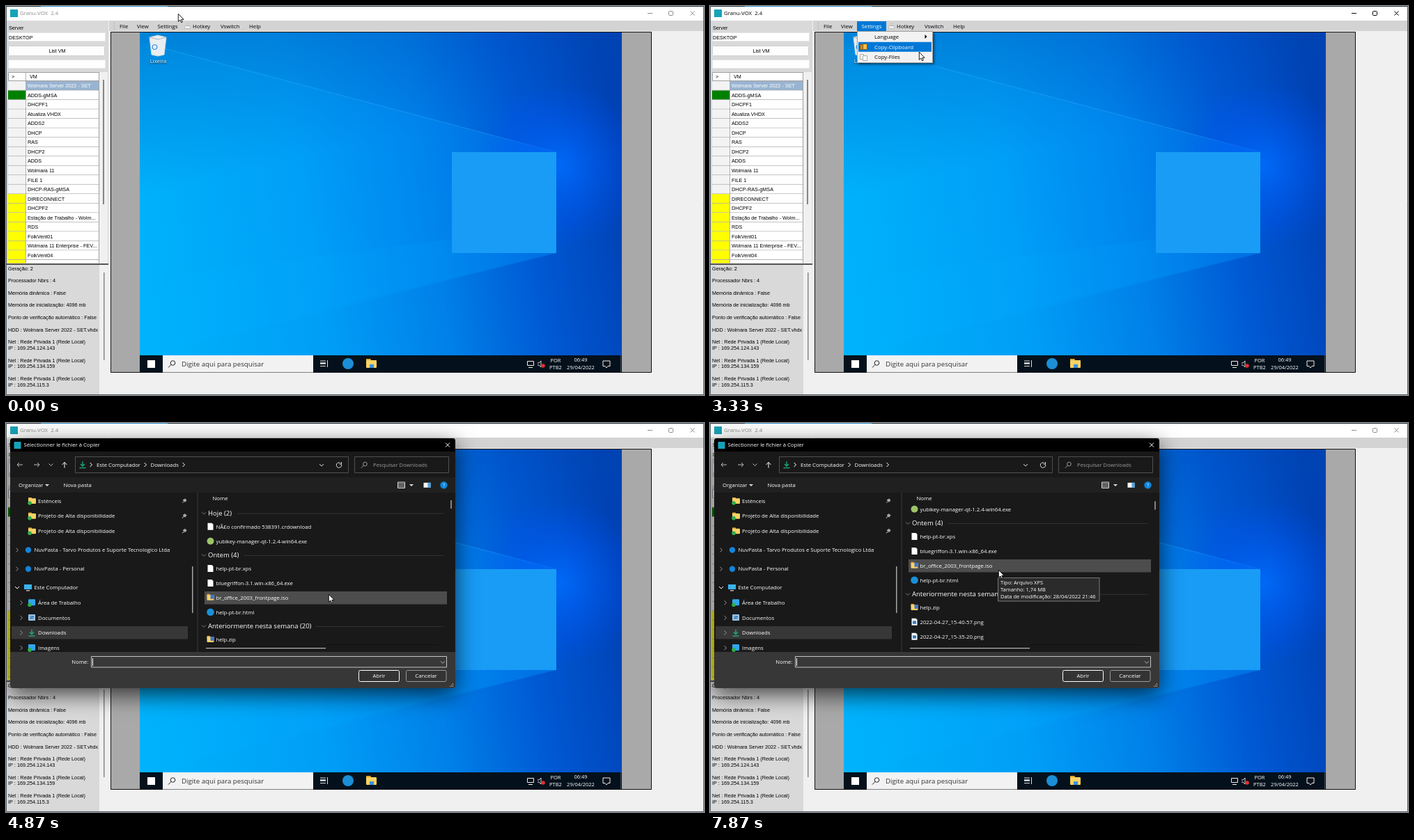
Animation of 1002x559 px, one loop 8000 ms. Source, as an HTML page with a canvas:

```html
<!DOCTYPE html>
<html lang="pt">
<head>
<meta charset="utf-8">
<title>Virtual machine manager</title>
<style>
  html, body { margin: 0; width: 100%; height: 100%; overflow: hidden; background: #f0f0f0; }
  canvas { display: block; }
</style>
</head>
<body>
<canvas id="stage" width="1002" height="559"></canvas>
<script>
const ctx = document.getElementById('stage').getContext('2d');
const LOOP = 8000, FRAME = 1000 / 15;
const UI = '"Open Sans", "Noto Sans", sans-serif';
const CLASSIC = '"Liberation Sans", Arial, sans-serif';
const TEAL = '#16a3b8', BLUE = '#0078d7';

// drawing helpers
function box(x, y, w, h, fill, stroke, radius = 0) {
  ctx.beginPath();
  ctx.roundRect(x, y, w, h, radius);
  if (fill) { ctx.fillStyle = fill; ctx.fill(); }
  if (stroke) {
    ctx.beginPath();
    ctx.roundRect(x + .5, y + .5, w - 1, h - 1, radius);
    ctx.strokeStyle = stroke; ctx.lineWidth = 1; ctx.stroke();
  }
}
function path(points, stroke, width = 1, fill) {
  ctx.beginPath();
  for (let i = 0; i < points.length; i += 2) ctx.lineTo(points[i], points[i + 1]);
  if (fill) { ctx.closePath(); ctx.fillStyle = fill; ctx.fill(); }
  if (stroke) { ctx.strokeStyle = stroke; ctx.lineWidth = width; ctx.stroke(); }
}
function disc(x, y, r, fill, stroke) {
  ctx.beginPath();
  ctx.arc(x, y, r, 0, 7);
  if (fill) { ctx.fillStyle = fill; ctx.fill(); }
  if (stroke) { ctx.strokeStyle = stroke; ctx.lineWidth = 1; ctx.stroke(); }
}
// y is the optical centre of the line
function text(str, x, y, color = '#000', size = 7.8, family = UI, align = 'left') {
  ctx.font = `${size}px ${family}`;
  ctx.textAlign = align;
  ctx.fillStyle = color;
  ctx.fillText(str, x, y + size * .35);
}
const classic = (str, x, y, color, align) => text(str, x, y, color, 7.25, CLASSIC, align);
const light = (str, x, y, size = 7.75, align) => text(str, x, y, '#fff', size, UI, align);
const cross = (x, y, r, color) => {
  path([x - r, y - r, x + r, y + r], color);
  path([x - r, y + r, x + r, y - r], color);
};
const chevron = (x, y, down, color = '#999') =>
  path(down ? [x - 3, y - 1.5, x, y + 1.5, x + 3, y - 1.5] : [x - 1.5, y - 3, x + 1.5, y, x - 1.5, y + 3], color);
function magnifier(x, y, r, color) {
  disc(x, y, r, null, color);
  path([x - r * .7, y + r * .7, x - r * 2, y + r * 2], color);
}
function gradient(g, stops) {
  stops.forEach(([at, color]) => g.addColorStop(at, color));
  return g;
}
function clipped(x, y, w, h, draw) {
  ctx.save();
  ctx.beginPath(); ctx.rect(x, y, w, h); ctx.clip();
  draw();
  ctx.restore();
}

// pointer: time, x, y
const POINTER = [
  [0, 247, 11], [330, 229, 55], [600, 219, 30], [2600, 219, 30], [3470, 306, 69], [3600, 254, 72],
  [4070, 254, 72], [4470, 461, 248], [4600, 463, 246], [4930, 463, 246], [5470, 393, 178],
  [5800, 398, 152], [6270, 414, 211], [LOOP, 414, 211]
];
function pointerAt(t) {
  const i = Math.max(1, POINTER.findIndex(k => k[0] >= t));
  const [t0, x0, y0] = POINTER[i - 1], [t1, x1, y1] = POINTER[i];
  const u = (t - t0) / (t1 - t0), e = u * u * (3 - 2 * u);
  return { x: Math.round(x0 + (x1 - x0) * e), y: Math.round(y0 + (y1 - y0) * e) };
}
function drawPointer({ x, y }) {
  const shape = [0, 0, 0, 11, 2.6, 8.7, 4.3, 12.4, 6, 11.6, 4.4, 8, 7.8, 8];
  path([...shape, 0, 0].map((v, i) => v + (i % 2 ? y : x) + .3), '#000', .9, '#fff');
}

const MACHINES = ['Wolmara Server 2022 - SET', 'ADDS-gMSA', 'DHCPF1', 'Atualiza VHDX', 'ADDS2', 'DHCP', 'RAS',
  'DHCP2', 'ADDS', 'Wolmara 11', 'FILE 1', 'DHCP-RAS-gMSA', 'DIRECONNECT', 'DHCPF2',
  'Estação de Trabalho - Wolm...', 'RDS', 'FolkVent01', 'Wolmara 11 Enterprise - FEV...', 'FolkVent04', ''];
const DETAILS = [[377, 'Geração: 2'], [394.5, 'Processador Nbrs : 4'], [412, 'Memória dinâmica : False'],
  [429.5, 'Memória de inicialização: 4096 mb'], [447.5, 'Ponto de verificação automático : False'],
  [465, 'HDD : Wolmara Server 2022 - SET.vhdx'],
  [482.5, 'Net : Rede Privada 1 (Rede Local)'], [491, 'IP : 169.254.124.143'],
  [509, 'Net : Rede Privada 1 (Rede Local)'], [517.5, 'IP : 169.254.134.159'],
  [535.5, 'Net : Rede Privada 1 (Rede Local)'], [544, 'IP : 169.254.115.3']];

function drawSidebar() {
  box(1, 21, 146, 537, '#d9d9d9');
  classic('Server', 4, 31.5);
  box(3, 38, 140, 13, '#fff', '#e6e6e6');
  classic('DESKTOP', 4, 45);
  box(3, 57, 139, 15, '#fdfdfd', '#cfcfcf', 2);
  classic('List VM', 73.5, 64.5, '#000', 'center');
  box(3, 77, 140, 13, '#fff', '#e6e6e6');
  box(3, 95, 143, 275, '#f0f0f0');
  clipped(3, 95, 131, 274.5, () => {
    box(3, 95, 131, 13, '#fff', '#a0a0a0');
    classic('>', 8, 101.5);
    classic('VM', 34, 101.5);
    MACHINES.forEach((name, i) => {
      const y = 108 + i * 13.52;
      box(3, y, 25.5, 13, i == 1 ? '#008000' : i > 11 ? '#ff0' : '#f3f3f3');
      box(29, y, 104, 13, i ? '#fff' : '#99b4d1');
      path([3, y + 13.2, 134, y + 13.2], '#a0a0a0', .8);
      classic(name, 31, y + 6.8, i ? '#000' : '#fff');
    });
    path([28.5, 95, 28.5, 370], '#a0a0a0', .8);
    path([133.5, 95, 133.5, 370], '#a0a0a0');
  });
  box(139, 106, 2, 179, '#858585');
  box(1, 370, 146, 2, '#555');
  box(134, 372, 13, 186, '#f0f0f0');
  clipped(1, 372, 133, 186, () => DETAILS.forEach(([y, str]) => classic(str, 3, y)));
  box(140, 383, 1.5, 126, '#858585');
}

function drawDesktop() {
  box(150, 37, 777, 490, '#a9a9a9', '#111');
  clipped(192, 38, 692, 464, () => {
    box(192, 38, 692, 464, gradient(ctx.createLinearGradient(192, 360, 884, 250),
      [[0, '#00b2fb'], [.35, '#009ef6'], [.6, '#0080e8'], [.8, '#0059d4'], [1, '#0042b4']]));
    box(192, 38, 692, 464, gradient(ctx.createLinearGradient(250, 38, 300, 250),
      [[0, 'rgba(0,70,170,.4)'], [1, 'rgba(0,70,170,0)']]));
    path([192, 50, 790, 210, 790, 355, 192, 500], null, 1, gradient(ctx.createLinearGradient(192, 0, 790, 0),
      [[0, 'rgba(0,180,255,.08)'], [1, 'rgba(0,140,255,.35)']]));
    path([640, 335, 192, 392, 192, 500, 380, 460, 790, 355], null, 1, 'rgba(0,180,255,.1)');
    path([222, 60, 790, 210], 'rgba(60,180,255,.35)');
    box(640, 80, 244, 320, gradient(ctx.createRadialGradient(795, 230, 5, 795, 230, 120),
      [[0, 'rgba(0,110,255,.8)'], [1, 'rgba(0,80,255,0)']]));
    box(640, 210, 150, 145, '#189cf6');
  });
  // recycle bin
  path([206, 45, 218, 42, 230, 45, 227, 70, 218, 72, 209, 70], '#cfd8de', 1, '#e9eef2');
  path([206, 45, 218, 48, 230, 45], '#a9b4bc');
  disc(213.5, 59, 3.5, null, '#0a7ad8');
  ctx.save();
  ctx.shadowColor = '#000'; ctx.shadowBlur = 2; ctx.shadowOffsetY = 1;
  light('Lixeira', 218.5, 79.5, 7.8, 'center');
  ctx.restore();
  drawTaskbar();
}

function folder(x, y, w, h) {
  box(x, y, w * .45, h * .4, '#e0a52a');
  box(x, y + h * .15, w, h * .85, '#f9d266', null, 1);
}
function drawTaskbar() {
  box(192, 502, 692, 24.5, '#04111c');
  box(203, 509, 11, 11, '#fff');
  box(225, 502, 216, 24.5, '#f2f2f2');
  magnifier(239.5, 513, 3.3, '#222');
  text('Digite aqui para pesquisar', 252, 514.5, '#333', 9.7);
  for (const y of [510, 513.5, 517.5]) path([451, y, 459, y], '#ddd', y == 513.5 ? 2.5 : 1);
  path([461.5, 509, 461.5, 519], '#ddd');
  disc(491, 514, 8, '#1b8fd6');
  folder(517, 507, 15, 13);
  box(522, 515, 6, 5, '#3f8fd8');
  box(748, 510, 10, 7, null, '#eee');
  path([750, 519.5, 756, 519.5], '#eee');
  path([763, 513, 765, 513, 768, 510, 768, 519, 765, 516, 763, 516], '#eee', .9);
  disc(771, 517, 2.8, '#e03030');
  light('POR', 789, 509, 7.5, 'center');
  light('PTB2', 789, 519.7, 7.5, 'center');
  light('06:49', 825, 508.5, 7.5, 'center');
  light('29/04/2022', 825, 519.7, 7.5, 'center');
  path([857, 510, 867, 510, 867, 517.5, 864, 517.5, 862, 520, 860, 517.5, 857, 517.5, 857, 510], '#eee');
  path([882.5, 502, 882.5, 526], '#46525c');
}

function drawWindow(active, menuTitleLit) {
  const ink = active ? '#000' : '#8a8a8a';
  box(0, 0, 1002, 559, '#f0f0f0');
  box(0, 0, 1002, 21, '#fff');
  box(0, 0, 1002, 1, '#24303c');
  box(50, 0, 182, 1, '#2f8fd0');
  box(6, 5, 11, 11, TEAL);
  text('Granu-VOX  2.4', 20, 10.5, ink);
  path([921, 10.5, 928, 10.5], ink);
  box(951, 7, 7, 7, null, ink, 1);
  cross(985.5, 10.5, 3, ink);
  drawSidebar();
  box(148, 21, 853, 15, '#d3d3d3');
  for (let y = 24; y < 35; y += 3) box(155, y, 1, 1, '#999');
  if (menuTitleLit) box(211, 22, 42, 14, BLUE);
  [['File', 163], ['View', 188], ['Settings', 217.5], ['Hotkey', 268], ['Vswitch', 308], ['Help', 349]]
    .forEach(([str, x]) => text(str, x, 29, menuTitleLit && str == 'Settings' ? '#fff' : '#000'));
  box(256, 28, 9, 5, '#eee', '#bbb');
  box(258.5, 25, 4, 3, '#eee', '#bbb');
  drawDesktop();
  path([0.5, 0, .5, 558.5, 1001.5, 558.5, 1001.5, 0], '#56606a');
}

function drawMenu(pointer) {
  ctx.save();
  ctx.shadowColor = 'rgba(0,0,0,.5)'; ctx.shadowBlur = 3; ctx.shadowOffsetX = ctx.shadowOffsetY = 2;
  box(211, 37, 109, 45, '#f2f2f2');
  ctx.restore();
  box(211, 36, 109, 46, null, '#a0a0a0');
  ['Language', 'Copy-Clipboard', 'Copy-Files'].forEach((str, i) => {
    const y = 44 + i * 14.8, lit = Math.abs(pointer.y - y) < 7.4;
    if (lit) box(213, y - 7, 105, 14, BLUE);
    text(str, 236, y, lit ? '#fff' : '#000');
    if (!i) path([308.5, y - 3, 311.5, y, 308.5, y + 3], null, 1, lit ? '#fff' : '#000');
  });
  box(215, 55, 8, 8, '#c98d2c', '#7a5a20');
  box(219, 54, 7, 9, '#f3c14b', '#7a5a20');
  box(215, 69, 6, 8, '#fff', '#aaa');
  box(219, 71, 7, 8, '#fff', '#aaa');
}

function shell(x, y, w, h, icon, title) {
  ctx.save();
  ctx.shadowColor = 'rgba(0,0,0,.7)'; ctx.shadowBlur = 32; ctx.shadowOffsetY = 9;
  box(x, y, w, h, '#373737', null, 4);
  ctx.restore();
  box(x, y, w, 19.5, '#000', null, [4, 4, 0, 0]);
  box(icon, y + 5, 10, 10, TEAL);
  light(title, icon + 14, y + 9.5, w < 630 ? 7.5 : 7.7);
  cross(x + w - 11, y + 9.5, 3, '#fff');
}
const TITLE = 'Sélectionner le fichier à Copier';
function viewIcons(x, y) {
  box(x, y - 3.5, 10, 7, '#f4f4f4');
  box(x + 6, y - 3.5, 4, 7, '#4aa3e8');
  disc(x + 29, y, 5.2, '#0d86d8');
  light('?', x + 29, y, 7.5, 'center');
}

function drawLoadingDialog() {
  shell(12, 27, 618, 347, 17, TITLE);
  box(12, 46, 423.5, 278, '#191919');
  for (const y of [46, 82]) {
    box(12, y, 423.5, 20, '#202020');
    viewIcons(392, y + 10);
    light('Nome', 292.5, y + 29, 7.8);
  }
  path([272, 66, 272, 82], '#383838');
  path([272, 102, 272, 324], '#383838');
  light('Trabalhando nisso...', 354, 133.5, 7.6, 'center');
  box(264.5, 205, 1.2, 65, '#c8c8c8');
  box(97, 332, 23, 11, '#191919');
  box(123, 330, 495, 16, '#fff');
}

function drawTree() {
  [[112, 'Esténceis'], [133.7, 'Projeto de Alta disponibilidade'], [155.3, 'Projeto de Alta disponibilidade']]
    .forEach(([y, str]) => {
      folder(32, y - 5, 11, 9);
      disc(34, y + 3, 2.8, '#2fae4a');
      light(str, 46, y);
      path([253, y + 3, 256, y, 254, y - 1, 257, y - 3, 259, y - 1, 257, y + 1.5, 256, y], '#aaa', 1, '#aaa');
    });
  [[182.5, 'NuvPasta - Tarvo Produtos e Suporte Tecnologico Ltda'], [209.7, 'NuvPasta - Personal']]
    .forEach(([y, str]) => {
      chevron(16, y);
      disc(32, y, 4.2, '#1583d8');
      light(str, 40.5, y);
    });
  chevron(16, 236.5, true, '#fff');
  box(26, 232, 11, 7, '#3bb3ee');
  box(29, 240, 5, 1.5, '#bbb');
  light('Este Computador', 40.5, 236.7);
  box(8, 292, 253, 18.5, '#373737');
  ['Área de Trabalho', 'Documentos', 'Downloads', 'Imagens'].forEach((str, i) => {
    const y = 258.3 + i * 21.6;
    chevron(22, y);
    light(str, 46, y);
    if (i == 2) downArrow(37, y);
    else {
      box(32, y - 5, 10, 9, i == 1 ? '#9cc4e6' : '#31a6e8', null, 1);
      if (i == 1) path([34, y - 2, 40, y - 2, 34, y + 1, 40, y + 1], '#27679c');
      else disc(34, y + 3, 2.8, '#2fae4a');
    }
  });
  box(267, 206, 1.5, 67, '#a6a6a6');
}
function downArrow(x, y) {
  path([x, y - 5, x, y + 2], '#22b07d', 1.3);
  path([x - 3, y - 1, x, y + 2, x + 3, y - 1], '#22b07d', 1.3);
  path([x - 4.5, y + 4.5, x + 4.5, y + 4.5], '#22b07d', 1.3);
}

const GROUPS = [[129.7, 'Hoje (2)', 327], [190, 'Ontem (4)', 336], [292, 'Anteriormente nesta semana (20)', 440]];
const FILES = [[149.3, 'doc', 'NÃ£o confirmado 538391.crdownload'], [170.3, 'app', 'yubikey-manager-qt-1.2.4-win64.exe'],
  [209.5, 'doc', 'help-pt-br.xps'], [230.4, 'doc', 'bluegriffon-3.1.win-x86_64.exe'],
  [251.3, 'zip', 'br_office_2003_frontpage.iso'], [272.2, 'web', 'help-pt-br.html'], [311.4, 'zip', 'help.zip'],
  [332.3, 'img', '2022-04-27_15-40-57.png'], [353.2, 'img', '2022-04-27_15-35-20.png']];
function fileIcon(kind, x, y) {
  if (kind == 'app') return disc(x, y, 5, '#9cc36a');
  if (kind == 'web') return disc(x, y, 5.3, '#1b8fd6');
  if (kind == 'zip') {
    folder(x - 5, y - 5, 10, 9);
    return box(x, y - 4, 5, 6, '#3f74d0');
  }
  path([x - 4, y - 5, x + 2, y - 5, x + 4, y - 3, x + 4, y + 5, x - 4, y + 5], null, 1, '#fff');
  if (kind == 'img') box(x - 2.5, y - 1.5, 5, 4.5, '#2e7fc4');
}
function drawFiles(pointer, scroll) {
  clipped(276, 112, 358, 206, () => {
    ctx.translate(0, -scroll);
    FILES.forEach(([y, kind, name]) => {
      if (Math.abs(pointer.y + scroll - y) < 9.5) box(285, y - 9.3, 348, 18.5, '#4d4d4d');
      fileIcon(kind, 293.5, y - .5);
      light(name, 301.5, y);
    });
    GROUPS.forEach(([y, name, end]) => {
      chevron(284, y, true, '#777');
      light(name, 290, y, 9.5);
      path([end + 5, y + .5, 628, y + .5], '#303030');
    });
  });
  box(638.3, scroll ? 112.5 : 111, 1.4, 12, '#b4b4b4');
  path([459, 318.5, 621, 318.5], '#101010');
  box(287, 323, 172, 1.3, '#b4b4b4');
}

function drawDialog(t, pointer) {
  shell(6, 22, 639, 359, 11.5, TITLE);
  box(6, 41.5, 639, 287.5, '#191919');
  box(6, 78, 639, 22, '#202020');
  // address row
  for (const [x, dir, color] of [[20, -1, '#bbb'], [44, 1, '#bbb']]) {
    path([x - 4, 60, x + 4, 60], color);
    path([x + dir, 57, x + 4 * dir, 60, x + dir, 63], color);
  }
  chevron(64.5, 60, true, '#bbb');
  path([84, 64.5, 84, 56.5], '#fff');
  path([80.5, 60, 84, 56.5, 87.5, 60], '#fff');
  box(99, 48, 393, 24, '#191919', '#505050');
  downArrow(110, 60);
  [122, 200, 255].forEach(x => chevron(x, 60, false, '#fff'));
  light('Este Computador', 130, 60);
  light('Downloads', 207.5, 60);
  chevron(453, 60.5, true, '#ddd');
  ctx.beginPath(); ctx.arc(478, 60.5, 3.6, -.3, 5.2);
  ctx.strokeStyle = '#ddd'; ctx.stroke();
  path([481.5, 56, 481.5, 59, 478.5, 59], '#ddd');
  box(500, 48, 136, 24, '#191919', '#505050');
  magnifier(515.5, 59, 2.8, '#999');
  text('Pesquisar Downloads', 527, 60, '#9a9a9a', 7.75);
  // command row
  light('Organizar', 18, 89.3);
  path([56, 88, 62, 88, 59, 91], null, 1, '#ddd');
  light('Nova pasta', 82.5, 89.3);
  box(562, 84.5, 11, 9.5, null, '#ddd');
  for (const y of [87, 89.3, 91.6]) path([563, y, 572, y], '#ddd', .8);
  path([579, 88, 585, 88, 582, 91], null, 1, '#ddd');
  viewIcons(599.5, 89.3);

  clipped(6, 100, 269, 229, drawTree);
  path([275, 100, 275, 329], '#383838');
  light('Nome', 296.5, 108.7);
  drawFiles(pointer, t >= 7596 ? 46 : 0);
  // name field and buttons
  light('Nome:', 118.5, 343.5, 7.75, 'right');
  box(122, 335, 511, 16.5, '#383838', '#c4c4c4');
  chevron(627, 343.8, true, '#bbb');
  if (Math.floor((t - 4663) / 533.3) % 2 == 0) box(124, 338, 1, 11, '#fff');
  box(506, 355, 59, 17, '#333', '#fff', 2);
  light('Abrir', 535.5, 363.5, 7.75, 'center');
  box(574, 355, 58.5, 17, '#333', '#9a9a9a', 2);
  light('Cancelar', 603, 363.5, 7.75, 'center');
  for (let i = 0; i < 3; i++) for (let j = 0; j <= i; j++) box(641 - j * 2, 374 + i * 2, 1, 1, '#ccc');

  if (t >= 6996) {
    ctx.globalAlpha = Math.min(1, (t - 6930) / 270);
    box(413, 222, 146.5, 34.5, '#2b2b2b', '#767676');
    ['Tipo: Arquivo XPS', 'Tamanho: 1,74 MB', 'Data de modificação: 28/04/2022 21:46']
      .forEach((str, i) => light(str, 417, 229.3 + i * 10.1, 7.5));
    ctx.globalAlpha = 1;
  }
}

function draw(t) {
  const pointer = pointerAt(t);
  const active = t >= 865 && t < 4130;
  drawWindow(active, active);
  if (active && t >= 2065) drawMenu(pointer);
  if (t >= 4665) drawDialog(t, pointer);
  else if (t >= 4530) {
    ctx.globalAlpha = t < 4598 ? .5 : 1;
    drawLoadingDialog();
    ctx.globalAlpha = 1;
  }
  drawPointer(pointer);
}

const start = performance.now();
function tick() {
  const t = (performance.now() - start) % LOOP;
  draw(Math.min(LOOP - 1, Math.floor((t + 4) / FRAME) * FRAME));
  requestAnimationFrame(tick);
}
tick();
</script>
</body>
</html>
```
